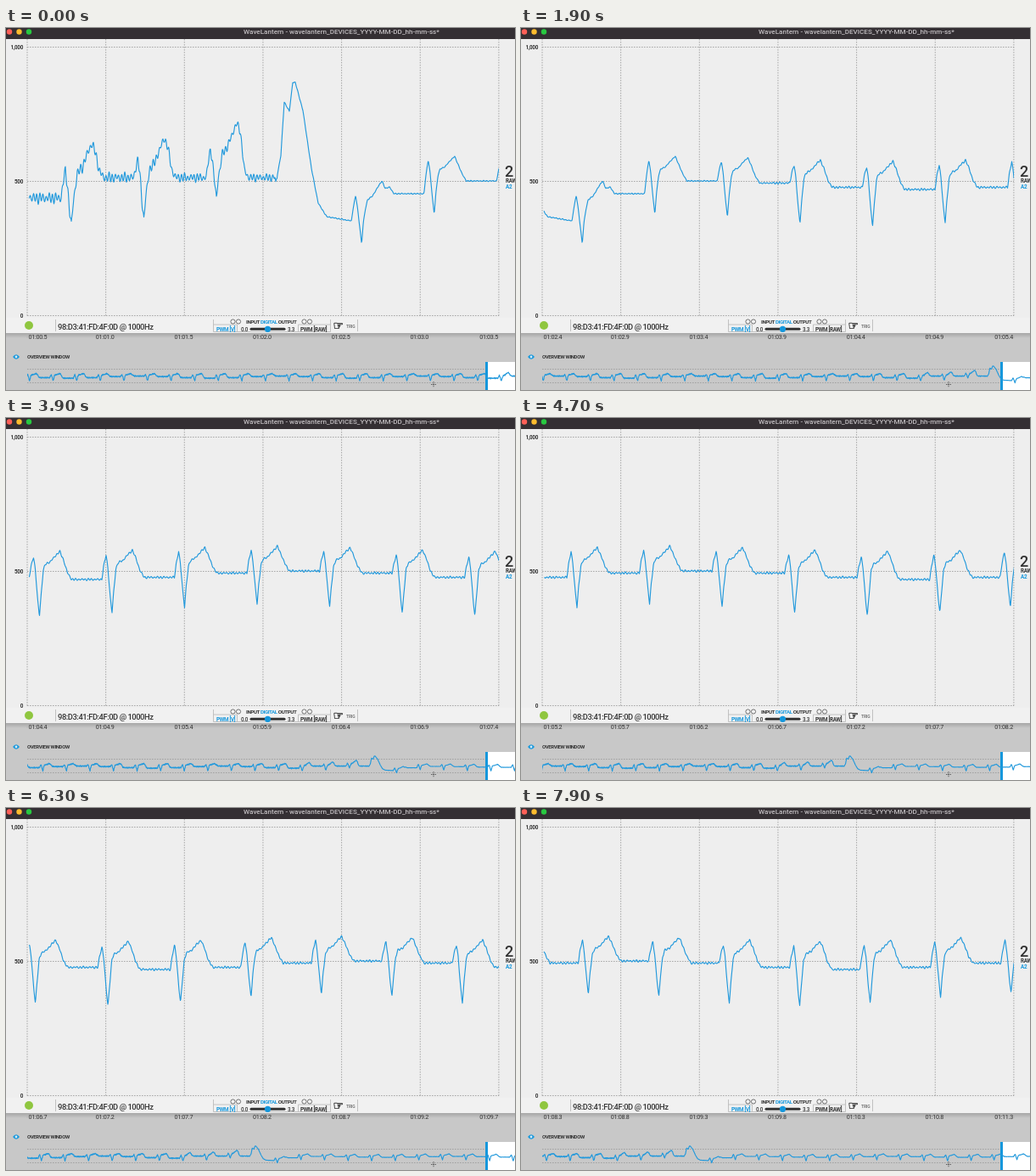
Write an HTML page that moves like this. It is 600 by 426 pixels and loops after 8000 ms.

```html
<!DOCTYPE html>
<html lang="en">
<head>
<meta charset="utf-8">
<title>Signal viewer</title>
<style>
html, body { margin: 0; width: 100%; height: 100%; overflow: hidden; background: #c8c8c8; }
svg { display: block; width: 600px; height: 426px; }
text { font: 500 6.3px Roboto, sans-serif; letter-spacing: -.3px; fill: #333; }
.bold { font-weight: 700; }
.blue { fill: #1597dc; }
.time { font-size: 7.2px; font-weight: 400; }
.trace { fill: none; stroke: #2299dc; stroke-width: 1.15; stroke-linejoin: round; }
.grid { stroke: #999; stroke-width: .8; stroke-dasharray: 1.6 1.4; fill: none; }
.rule { stroke: #b5b5b5; stroke-width: .8; fill: none; }
.ring { stroke: #555; stroke-width: .8; fill: none; }
</style>
</head>
<body>
<svg viewBox="0 0 600 426">
  <defs>
    <linearGradient id="shade" x2="0" y2="1">
      <stop stop-color="#a6a6a6"/><stop offset="1" stop-color="#c8c8c8"/>
    </linearGradient>
    <clipPath id="plot"><path d="M25 13H581V340H25z"/></clipPath>
    <clipPath id="strip"><path d="M25 390H600V426H25z"/></clipPath>
  </defs>
  <rect width="600" height="426" fill="#c8c8c8"/>
  <rect y="359" width="600" height="6" fill="url(#shade)"/>
  <rect width="600" height="359" fill="#eee"/>
  <rect y="341" width="600" height="18" fill="#f1f1f1"/>
  <rect width="600" height="13" fill="#342f33"/>
  <circle cx="4" cy="4.5" r="3.2" fill="#ff5f57"/>
  <circle cx="15.5" cy="4.5" r="3.2" fill="#febc2e"/>
  <circle cx="27" cy="4.5" r="3.2" fill="#28c840"/>
  <text x="395.5" y="7" text-anchor="middle" style="font-size:8.1px;letter-spacing:0;fill:#c2bec1">WaveLantern - wavelantern_DEVICES_YYYY-MM-DD_hh-mm-ss*</text>

  <path class="grid" d="M25 22.5H581M25 180.5H581M25 338.5H581"/>
  <g id="columns"></g>
  <g text-anchor="end">
    <text class="bold" x="20" y="25">1,000</text>
    <text class="bold" x="20" y="183">500</text>
    <text class="bold" x="20" y="341">0</text>
  </g>
  <path id="main" class="trace" clip-path="url(#plot)"/>
  <text x="588" y="175" style="font-size:18px">2</text>
  <text class="bold" x="589" y="182">RAW</text>
  <text class="bold blue" x="589" y="189.3">A2</text>

  <circle cx="27" cy="350" r="5" fill="#8fc640"/>
  <path class="rule" d="M58.5 343V357M244.5 343V357.5H382.5V343M244.5 349H272.5V357M344.5 357V349H382.5M414.5 343V357"/>
  <text x="61" y="355" style="font-size:9.4px;letter-spacing:-.45px">98:D3:41:FD:4F:0D @ 1000Hz</text>
  <g class="ring">
    <circle cx="267.5" cy="345.5" r="2.6"/><circle cx="274" cy="345.5" r="2.6"/>
    <circle cx="351.5" cy="345.5" r="2.6"/><circle cx="358" cy="345.5" r="2.6"/>
  </g>
  <text class="bold" x="283" y="348" style="font-size:6.2px;letter-spacing:-.42px">INPUT <tspan class="blue">DIGITAL</tspan> OUTPUT</text>
  <text class="bold blue" x="248" y="356.5">PWM [V]</text>
  <text x="277" y="356.5">0.0</text>
  <path d="M289 354.3H328" stroke="#333" stroke-width="3" stroke-linecap="round"/>
  <circle cx="308.5" cy="354.3" r="3.6" fill="#1597dc"/>
  <text x="332" y="356.5">3.3</text>
  <text class="bold" x="347" y="356.5">PWM [RAW]</text>
  <text x="385.5" y="355" style="font:14px 'DejaVu Sans',sans-serif;stroke:#333;stroke-width:.5px">☞</text>
  <text x="401" y="353" style="font-size:5px;letter-spacing:-.1px;fill:#666">TRIG</text>

  <path d="M8 387Q12 381.5 16 387Q12 392.5 8 387z" class="blue"/>
  <circle cx="12" cy="387" r="1.4" fill="#d5e8f3"/>
  <text class="bold" x="25" y="389.2" style="font-size:6px;letter-spacing:-.38px">OVERVIEW WINDOW</text>
  <path class="grid" d="M25 401.5H565M25 417.5H565"/>
  <rect x="567" y="393" width="33" height="33" fill="#fff"/>
  <rect x="565" y="393" width="3" height="33" class="blue"/>
  <path id="overview" class="trace" clip-path="url(#strip)"/>
  <path d="M504 416V423M501 419.5H507" stroke="#444" stroke-width=".8" stroke-dasharray="1.5 .8"/>
</svg>
<script>
const LEFT = 25, PER_SECOND = 185.3, ZOOM = .325, FIRST = -1660, STEP = .5;
const $ = id => document.getElementById(id);

// Signal knots in plot pixels; every heartbeat has the same outline
const knots = [];
function beat(x, peak, trough, hump, base, lift = 15) {
  const start = knots.length ? knots[knots.length - 1][1] : base;
  [[-5, start], [-3, (peak + start) / 2], [0, peak], [2, peak + 14], [5, trough - 18], [7, trough],
   [9, trough - 25], [11.5, hump + 1.5 * lift], [14, hump + lift], [20, hump + .8 * lift],
   [25, hump + .4 * lift], [31, hump], [35, hump + 9], [40, base - 8], [45, base], [76, base]]
    .forEach(([dx, y]) => knots.push([x + dx, y]));
}

// The subject moves: one tall swing, then a dip
function swing() {
  knots.push([318, 183], [324, 150], [328, 87], [334, 98], [338, 64], [341, 64],
    [350, 97], [360, 165], [368, 206], [378, 222], [407, 227]);
}

for (let i = -21; i < 25; i++) {
  const x = 70 + 85.55 * i - 2.5 * Math.max(0, i - 15);
  const breath = Math.cos((i - 8) * Math.PI / 3);
  if (i < 0) beat(x, 160, 230, 148, 188 - 12 * breath);
  else if (i < 3) beat(x, 168 - 13 * i, 233 - 8 * i * i, 136 - 6 * i * i, 176, 35);
  else if (i == 3) swing();
  else if (i == 4) beat(x, 197, 254, 180, 195, 22);
  else beat(x, 159 + 4 * breath, 226 + 7 * breath, 154 + 3 * breath, 185 + 5 * breath);
}

// Mains hum, strong until the swing
function ripple(x) {
  const size = x < 320 ? 6.5 - Math.max(0, x) / 130 : x < 640 ? .6 : 1.2;
  return size * Math.sin(x * 2 * Math.PI / 3.71) * (.75 + .25 * Math.sin(x * .37)) + size * .25 * Math.sin(x * .71);
}

const samples = [];
for (let x = FIRST, i = 0; x < 2060; x += STEP) {
  while (knots[i + 1][0] < x) i++;
  const [x0, y0] = knots[i], [x1, y1] = knots[i + 1];
  samples.push(y0 + (y1 - y0) * (x - x0) / (x1 - x0) + ripple(x));
}
const level = x => samples[Math.max(0, Math.round((x - FIRST) / STEP))];

function trace(from, to, step, mapX, mapY) {
  let d = '';
  for (let x = from; x <= to; x += step)
    d += (d ? 'L' : 'M') + mapX(x).toFixed(2) + ' ' + mapY(level(x)).toFixed(2);
  return d;
}

const columns = Array.from({ length: 7 }, (_, i) => LEFT + i * PER_SECOND / 2);
$('columns').innerHTML = columns.map((x, i) => {
  const anchor = i == 0 ? 'start' : i == 6 ? 'end' : 'middle';
  const shift = i == 0 ? 1.5 : -1;
  return `<path class="grid" d="M${x} 13V340"/><text class="time" x="${x + shift}" y="366" text-anchor="${anchor}"></text>`;
}).join('') + '<path class="rule" d="M25 360V365M581 360V365"/>';
const labels = document.querySelectorAll('.time');

// Distance scrolled at a few times; arrival of data is slightly uneven
const pace = [[0, 0], [1100, 194], [2700, 500], [3900, 722], [5600, 1029], [7000, 1280], [8000, 1465.5]];
function scrolled(t) {
  const i = pace.findIndex(p => p[0] > t), [t0, s0] = pace[i - 1], [t1, s1] = pace[i];
  return s0 + (s1 - s0) * (t - t0) / (t1 - t0);
}

function draw(now) {
  const offset = scrolled(Math.floor(now % 8000 / 100) * 100);
  const start = .49 + offset / PER_SECOND;
  labels.forEach((label, i) => {
    label.textContent = '01:' + (Math.round(start * 10) / 10 + i / 2).toFixed(1).padStart(4, '0');
  });
  const begin = Math.ceil(offset + 27);
  $('main').setAttribute('d', trace(begin, begin + 554, STEP, x => x - offset, y => y));
  $('overview').setAttribute('d', trace(Math.floor(offset) - 1645, offset + 130, 1,
    x => 567 + (x - offset - LEFT) * ZOOM, y => 410 + (y - 180) * .105));
  requestAnimationFrame(draw);
}
requestAnimationFrame(draw);
</script>
</body>
</html>
```
